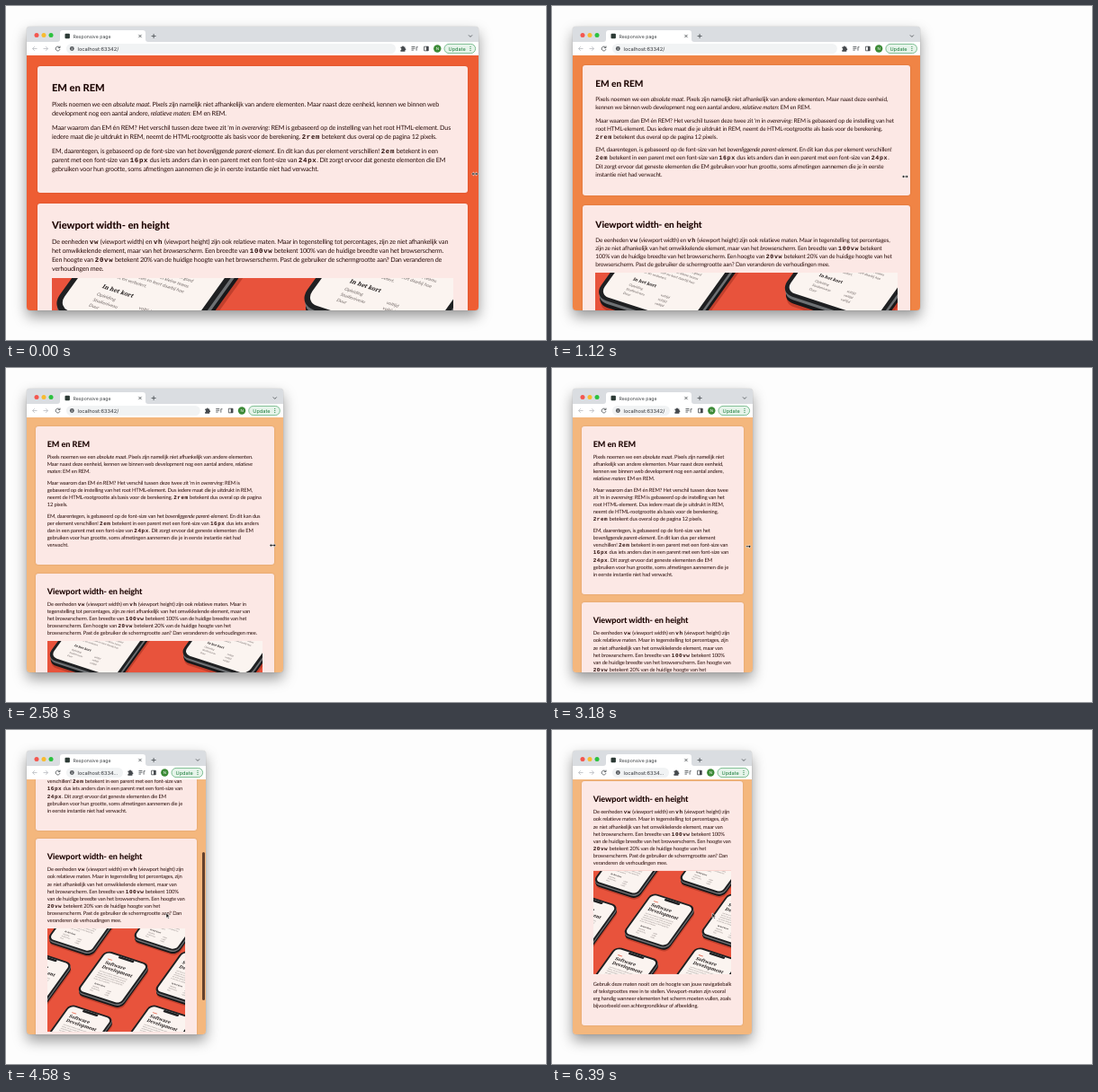
Recreate the animation shown at these times as an HTML page. Size 600x372 px, loop 6420 ms.

```html
<!DOCTYPE html>
<html lang="nl">
<head>
<meta charset="utf-8">
<title>Responsive page</title>
<style>
  html, body { margin: 0; width: 100%; height: 100%; overflow: hidden; background: #fdfdfd; }
  body { position: relative; font-family: Lato, sans-serif; text-rendering: geometricPrecision; color: #2b0f0c; }
  svg { display: block; }
  #win {
    position: absolute; left: 23px; top: 23px; height: 315.5px; overflow: hidden; border-radius: 4px;
  }
  #shade {
    position: absolute; left: 23px; top: 23px; height: 315.5px; border-radius: 4px;
    box-shadow: 0 0 1px rgba(0,0,0,.45), 0 7px 15px rgba(0,0,0,.4);
  }
  #bar { position: absolute; left: -23px; top: -23px; font-family: Inter, Roboto, sans-serif; }
  #view { position: absolute; top: 32px; left: 0; right: 0; bottom: 0; overflow: hidden; }
  main { display: grid; grid-template-columns: minmax(0, 1fr); gap: 1.5rem; padding: 1.5rem; }
  section {
    background: #fce8e5; padding: 2rem; border-radius: 3px; box-shadow: 0 0 2px rgba(90,30,0,.2);
  }
  h2, p { position: relative; top: .14rem; margin: 0 0 .75rem; }
  h2 { font-size: 1.4rem; line-height: 1.875rem; font-weight: 800; white-space: nowrap; color: #1d0503; }
  p { font-size: .9rem; line-height: 1.25rem; }
  code { font: 700 .92rem/0 "Liberation Mono", monospace; letter-spacing: .085rem; }
  #photo { width: 100%; aspect-ratio: 4 / 3; margin-bottom: 1rem; background: #e8533c; }
  #thumb { position: absolute; right: 1px; width: 2.6px; border-radius: 2px; background: rgba(45,20,15,.72); }
  #mouse { position: absolute; left: 0; top: 0; overflow: visible; }
</style>
</head>
<body>
<div id="shade"></div>
<div id="win">
  <div id="view">
    <main>
      <section>
        <h2>EM en REM</h2>
        <p>Pixels noemen we een <i>absolute maat</i>. Pixels zijn namelijk niet afhankelijk van andere elementen. Maar naast deze eenheid, kennen we binnen web development nog een aantal andere, <i>relatieve maten</i>: EM en REM.</p>
        <p>Maar waarom dan EM én REM? Het verschil tussen deze twee zit 'm in <i>overerving</i>: REM is gebaseerd op de instelling van het root HTML-element. Dus iedere maat die je uitdrukt in REM, neemt de HTML-rootgrootte als basis voor de berekening. <code>2rem</code> betekent dus overal op de pagina 12 pixels.</p>
        <p>EM, daarentegen, is gebaseerd op de font-size van het <i>bovenliggende parent-element</i>. En dit kan dus per element verschillen! <code>2em</code> betekent in een parent met een font-size van <code>16px</code> dus iets anders dan in een parent met een font-size van <code>24px</code>. Dit zorgt ervoor dat geneste elementen die EM gebruiken voor hun grootte, soms afmetingen aannemen die je in eerste instantie niet had verwacht.</p>
      </section>
      <section>
        <h2>Viewport width- en height</h2>
        <p>De eenheden <code>vw</code> (viewport width) en <code>vh</code> (viewport height) zijn ook relatieve maten. Maar in tegenstelling tot percentages, zijn ze niet afhankelijk van het omwikkelende element, maar van het&nbsp;<i>browserscherm</i>. Een breedte van <code>100vw</code> betekent 100% van de huidige breedte van het browserscherm. Een hoogte van <code>20vw</code> betekent 20% van de huidige hoogte van het browserscherm. Past de gebruiker de schermgrootte aan? Dan veranderen de verhoudingen mee.</p>
        <svg id="photo" viewBox="0 0 154 115.5">
          <defs>
            <g id="phone">
              <rect x="4" y="5" width="52" height="57" rx="7" fill="#a93322" opacity=".6"/>
              <rect x="2.6" y="3.4" width="52" height="57" rx="7" fill="#17181a"/>
              <rect x="1.2" y="1.5" width="52" height="57" rx="7" fill="#6d7073"/>
              <rect width="52" height="57" rx="7" fill="#1f2022"/>
              <rect x="2" y="2" width="48" height="53" rx="5" fill="#fbf4f0"/>
              <rect x="17" y="2" width="18" height="2.6" rx="1.3" fill="#1f2022"/>
              <g font-family="'Noto Serif', serif" font-weight="700" fill="#1f1a1a">
                <text x="8" y="15.5" font-size="5.2">Software</text>
                <text x="8" y="21.4" font-size="5.2">Development</text>
                <text x="12" y="42" font-size="2.3">In het kort</text>
              </g>
              <rect x="8" y="8.6" width="5" height="1" fill="#e8735c"/>
              <g id="fine" font-size="1.75" fill="#6b6260"></g>
            </g>
          </defs>
        </svg>
        <p>Gebruik deze maten nooit om de hoogte van jouw navigatiebalk of tekstgroottes mee in te stellen. Viewport-maten zijn vooral erg handig wanneer elementen het scherm moeten vullen, zoals bijvoorbeeld een achtergrondkleur of afbeelding.</p>
      </section>
    </main>
    <div id="thumb"></div>
  </div>
  <svg id="bar" width="600" height="55">
    <path fill="#dadde1" d="M0 0H600V41H0z"/>
    <path fill="#fff" d="M0 40H600V55H0zM57 40q3 0 3-3V30q0-3 3-3H152q3 0 3 3v7q0 3 3 3z"/>
    <circle cx="34" cy="32.5" r="2.5" fill="#f4574f"/>
    <circle cx="42" cy="32.5" r="2.5" fill="#f8bb30"/>
    <circle cx="50" cy="32.5" r="2.5" fill="#2cc23f"/>
    <rect x="65.5" y="30.8" width="5.4" height="5.4" rx="1" fill="#2d3b36"/>
    <text x="74.5" y="35.6" font-size="5.2" fill="#3c4043">Responsive page</text>
    <g fill="none" stroke="#45494d" stroke-width=".8">
      <path d="M147.4 31.9l3.2 3.2m0-3.2l-3.2 3.2M161.6 33.5h5m-2.5-2.5v5"/>
      <path stroke="#b9bcc0" d="M34.5 47.5h-5m2.3-2.3l-2.3 2.3 2.3 2.3M41.5 47.5h5m-2.3-2.3l2.3 2.3-2.3 2.3"/>
      <path d="M59.6 46.2a2.4 2.4 0 1 0 .3 2M60 44.6v2h-2"/>
    </g>
    <rect id="pill" x="67" y="42" height="11" rx="5.5" fill="#f1f3f4"/>
    <circle cx="73.3" cy="47.5" r="2.4" fill="#54585c"/>
    <path d="M73.3 47.2v1.7m0-2.9v.6" stroke="#fff" stroke-width=".7"/>
    <text id="url" x="79.5" y="49.6" font-size="5.7" fill="#303338"></text>
    <g id="tools">
      <path d="M-11 32.4l2 2 2-2" fill="none" stroke="#45494d" stroke-width=".8"/>
      <path fill="#45494d" d="M-86.4 45.6h1.4a1 1 0 0 1 2 0h1.4v1.6a1 1 0 0 1 0 2v1.5h-5v-1.6a1 1 0 0 0 0-2z"/>
      <path d="M-74.5 45.5h4m-4 1.8h4m-4 1.8h2.4m3.2-3.4v4m0-4h1.6" stroke="#45494d" stroke-width=".8"/>
      <path d="M-60.4 45.2h4.6v4.6h-4.6z" fill="none" stroke="#45494d" stroke-width=".8"/>
      <path d="M-58 45h2.4v5H-58z" fill="#45494d"/>
      <circle cx="-45.7" cy="47.5" r="4.2" fill="#3b8a36"/>
      <text x="-45.7" y="49.1" font-size="4.4" fill="#fff" text-anchor="middle">N</text>
      <rect x="-38" y="42.4" width="34.6" height="10.2" rx="5.1" fill="#e6f4ea" stroke="#5fae78" stroke-width=".8"/>
      <text x="-33.5" y="49.6" font-size="5.6" fill="#1d7d3c">Update</text>
      <path d="M-9 44.9v1m0 1.1v1m0 1.1v1" stroke="#1d7d3c"/>
    </g>
  </svg>
</div>
<svg id="mouse" width="1" height="1">
  <g stroke="#fff" stroke-width=".6" fill="#111">
    <path id="both" d="M-3.6 0l2.2-2v1.3h2.8V-2l2.2 2-2.2 2V.7h-2.8V2z"/>
    <path id="single" d="M3-.2L.8-2.2v1.3h-3.6V.6H.8v1.3z"/>
    <path id="arrow" d="M-1-2.2v5.6l1.3-1.2 1 2 1-.5-1-1.9h1.8z"/>
  </g>
</svg>
<script>
const $ = id => document.getElementById(id);
const main = document.querySelector('main');
const LOOP = 6420, LEFT = 23, VIEW = 283.5;

const EDGE = [[0, 525], [150, 525], [700, 476], [1120, 409], [1360, 379], [1800, 346],
  [2060, 346], [2700, 299], [3180, 223], [3300, 222]];
const MOUSE_X = [[3330, 218], [3450, 217], [3900, 179]];
const MOUSE_Y = [[0, 187], [1120, 190], [1940, 196], [3180, 199], [3450, 200], [3900, 206]];
const SCROLL = [[4060, 0], [4300, .298], [4700, .85], [4880, 1.006], [4960, 1.006], [5320, 1]];
const THUMB = [[4040, 0], [4100, 1], [5400, 1], [5650, 0]];

function at(keys, t) {
  if (t <= keys[0][0]) return keys[0][1];
  for (let i = 1; i < keys.length; i++) {
    const [t0, a] = keys[i - 1], [t1, b] = keys[i];
    if (t < t1) return a + (b - a) * (t - t0) / (t1 - t0);
  }
  return keys[keys.length - 1][1];
}

// Tighten the typeface to a narrower average advance, given in em.
function tighten(selector, weight, advance) {
  const ctx = document.createElement('canvas').getContext('2d');
  ctx.font = `${weight} 100px Lato, sans-serif`;
  const all = document.querySelectorAll(selector);
  const sample = selector === 'p' ? all[0].textContent : all[1].textContent;
  const natural = ctx.measureText(sample).width / sample.length / 100;
  all.forEach(el => el.style.letterSpacing = advance - natural + 'em');
}
tighten('p', 400, .387 / .9);
tighten('h2', 800, .655 / 1.4);

const fine = ['Leer hoe je moderne software ontwerpt en', 'bouwt, van een eerste schets tot een goed',
  'werkend product. Je werkt in kleine teams', 'aan echte opdrachten en leert daarbij hoe', 'je slim test en verbetert.'];
const facts = ['Opleiding', 'Studieniveau', 'Duur'];
const small = (s, x, y) => `<text x="${x}" y="${y}">${s}</text>`;
$('fine').innerHTML = fine.map((s, i) => small(s, 8, 26 + i * 2.6)).join('') +
  facts.map((s, i) => small(s, 12, 45.5 + i * 2.6) + small('voltijd', 29, 45.5 + i * 2.6)).join('');

const phones = [[-33, -58], [62, -60], [-86, -1], [0, 0], [86, 0], [-40, 60], [50, 60]];
$('photo').insertAdjacentHTML('beforeend', phones.map(([x, y]) =>
  `<use href="#phone" transform="matrix(.95 .31 -.58 .81 ${65 + x} ${24 + y})"/>`).join(''));

function theme(width) {
  if (width > 486) return [8, '#ee5d33'];
  if (width > 311) return [7.24, '#f08445'];
  return [6.48, '#f4b77d'];
}

function draw() {
  const t = performance.now() % LOOP;
  const edge = at(EDGE, t), width = edge - LEFT;
  const [rem, color] = theme(width);
  document.documentElement.style.fontSize = rem + 'px';
  $('view').style.background = color;
  $('win').style.width = $('shade').style.width = width + 'px';
  $('tools').setAttribute('transform', `translate(${edge})`);
  $('pill').setAttribute('width', edge - 92 - 67);
  $('url').textContent = edge < 222.5 ? 'localhost:6334...' : 'localhost:63342/';

  const height = main.getBoundingClientRect().height;
  const scroll = at(SCROLL, t) * (height - VIEW);
  main.style.transform = `translateY(${-scroll}px)`;
  const thumb = $('thumb').style;
  thumb.height = VIEW * VIEW / height + 'px';
  thumb.top = scroll * VIEW / height + 'px';
  thumb.opacity = at(THUMB, t);

  // The pointer runs slightly ahead of the window edge it drags.
  const dragging = t < 3330;
  const x = dragging ? at(EDGE, t + 100) - 4 : at(MOUSE_X, t);
  $('mouse').style.transform = `translate(${x}px, ${at(MOUSE_Y, t)}px)`;
  const shape = !dragging ? 'arrow' : edge <= 223.5 ? 'single' : 'both';
  for (const id of ['both', 'single', 'arrow']) $(id).style.display = id === shape ? '' : 'none';
  requestAnimationFrame(draw);
}
draw();
</script>
</body>
</html>
```
